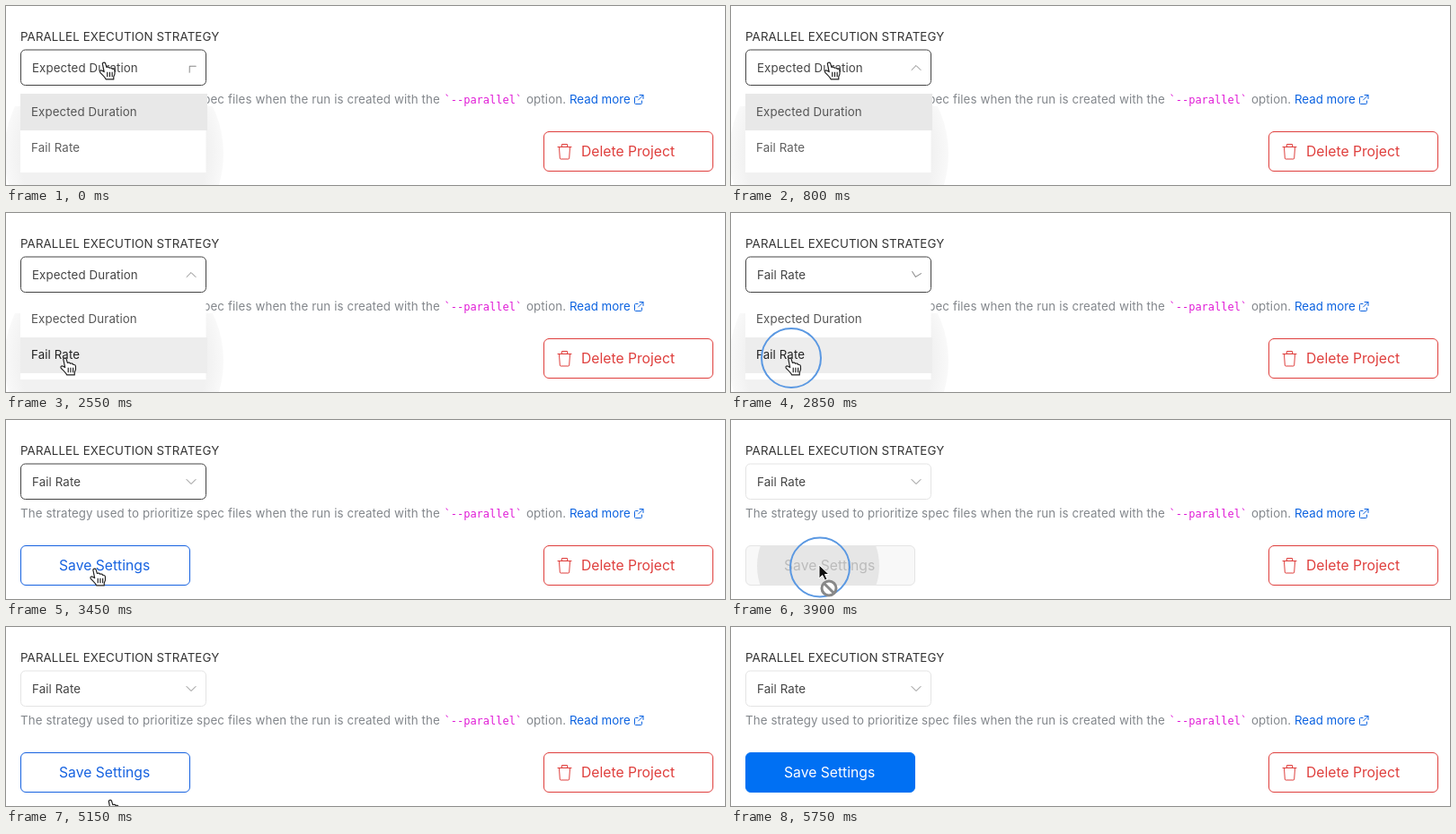
Write an HTML page that moves like this. It is 800 px wide and 200 px high and loops after 5800 ms.

```html
<!DOCTYPE html>
<html>
<head>
<meta charset="utf-8">
<style>
html, body { margin: 0; width: 100%; height: 100%; overflow: hidden; background: #fff; }
svg { display: block; font: 13.3px Inter, sans-serif; letter-spacing: .11px; }
.line { fill: none; stroke-linecap: round; stroke-linejoin: round; }
.big { font-size: 15.7px; letter-spacing: 0; }
.blue { fill: #0b62e0; letter-spacing: 0; }
.code { font: 12px 'DejaVu Sans Mono', monospace; letter-spacing: 0; fill: #e01bd6; }
</style>
</head>
<body>
<svg width="800" height="200" viewBox="0 0 800 200">
  <defs>
    <radialGradient id="soft">
      <stop offset=".85" stop-color="#f1f1f1"/>
      <stop offset="1" stop-color="#f9f9f9"/>
    </radialGradient>
    <clipPath id="saveClip"><rect x="16" y="140" width="189" height="45" rx="6"/></clipPath>
    <clipPath id="menuClip"><rect y="112" width="260" height="88"/></clipPath>
  </defs>

  <text x="16" y="39" fill="#333">PARALLEL EXECUTION STRATEGY</text>
  <rect id="select" x="16.5" y="49" width="206" height="39.5" rx="5" fill="#fff"/>
  <text id="value" x="29" y="73.5" fill="#444"></text>
  <path id="chevron" class="line" d="M-5-2.5 0 2.5 5-2.5" stroke="#888"/>

  <text x="16" y="108.5" fill="#83878c">The strategy used to prioritize spec files when the run is created with the</text>
  <text x="487.5" y="108.5" class="code">`--parallel`</text>
  <text x="579" y="108.5" fill="#83878c">option.</text>
  <text x="627" y="108.5" class="blue">Read more</text>
  <path class="line" stroke="#0b62e0" d="M703 101.5h-2.5q-1 0-1 1v6q0 1 1 1h6q1 0 1-1V106M705 99.5h4v4M709 99.5l-5.5 5.5"/>

  <rect id="save" x="16.5" y="140.5" width="188" height="44" rx="5.5"/>
  <circle id="pulse" cx="97" cy="163" r="68" fill="#e6e6e6" clip-path="url(#saveClip)"/>
  <text id="saveText" class="big" x="59" y="168">Save Settings</text>

  <g stroke="#df3f3d" class="line">
    <rect x="598.5" y="140.5" width="188" height="44" rx="5.5"/>
    <path d="M614 157.5h15M618.5 157v-2.5h6v2.5M615.5 158l.8 12q.1 1 1 1h8.4q.9 0 1-1l.8-12"/>
  </g>
  <text class="big" x="640" y="168" fill="#df3f3d">Delete Project</text>

  <g id="menu">
    <circle cx="120" cy="165" r="122" fill="url(#soft)" clip-path="url(#menuClip)"/>
    <rect x="16" y="98" width="206.5" height="88" fill="#fff"/>
    <rect id="row" x="16" width="208"/>
    <text x="28" y="122.5" fill="#555">Expected Duration</text>
    <text id="fail" x="28" y="163">Fail Rate</text>
  </g>

  <circle id="ring" fill="none" stroke="#5a98e2" stroke-width="2"/>
  <g id="hand" stroke="#222" stroke-width="1.1" stroke-linejoin="round">
    <path fill="#fff" d="M-2 1.2C-1.5-.3.6-.3 1 1L2.2 5C3.2 4.3 4.8 4.8 5.2 5.8 6.2 5.2 7.6 5.7 8 6.8 9.2 6.5 10.4 7.2 10.6 8.6 11 11 10.6 13.5 9.5 15V17.5H1.5C1 15.5-2.5 12.5-4.5 10.2-5.2 8.6-3.6 7.8-2.4 8.6L-.3 9.8Z"/>
    <path d="M3 10v5M5.5 10v5M8 10v5"/>
  </g>
  <g id="blocked" transform="translate(98 162)">
    <path d="M0 0V15L3.7 11.5 6.5 17 9 16 6.5 10.5H11Z" fill="#111" stroke="#fff"/>
    <circle cx="11" cy="26" r="8" fill="#fff" stroke="#888" stroke-width="3"/>
    <path d="M6 21 16 31" stroke="#888" stroke-width="3"/>
  </g>
</svg>
<script>
const LOOP = 5800;
const el = Object.fromEntries([...document.querySelectorAll('[id]')].map(e => [e.id, e]));
const set = (name, attrs) => { for (const k in attrs) el[name].setAttribute(k, attrs[k]); };
const ramp = (t, a, b) => Math.min(1, Math.max(0, (t - a) / (b - a)));
const ease = (t, a, b) => { const u = ramp(t, a, b); return u * u * (3 - 2 * u); };
const within = (t, a, b) => t >= a && t < b;
const blend = (a, b, u) => `rgb(${a.map((v, i) => Math.round(v + (b[i] - v) * u))})`;

const WHITE = [255, 255, 255], BLUE = [0, 112, 243], EDGE = [22, 98, 224];

// Cursor stops: time, x, y
const stops = [[2150, 109.5, 63], [2500, 66, 162], [3050, 66, 162], [3400, 99, 166],
  [4850, 99, 166], [4950, 103, 167], [5300, 125, 210]];

function cursorAt(t) {
  let [, x, y] = stops[0];
  for (let i = 1; i < stops.length; i++) {
    const [a, x0, y0] = stops[i - 1], [b, x1, y1] = stops[i];
    if (t < a) break;
    const u = ease(t, a, b);
    x = x0 + (x1 - x0) * u;
    y = y0 + (y1 - y0) * u;
  }
  return [x, y];
}

function drawSave(t, disabled) {
  const filled = 1 - ease(t, 2950, 3150) + ease(t, 5150, 5350);
  set('save', {
    fill: disabled ? '#f8f8f8' : blend(WHITE, BLUE, filled),
    stroke: disabled ? '#e4e4e4' : blend(EDGE, BLUE, filled)
  });
  set('saveText', { fill: disabled ? '#bbb' : blend(EDGE, WHITE, filled) });
  set('pulse', { opacity: disabled ? 1 - ramp(t, 3950, 4150) : 0 });
}

function draw(t) {
  const [x, y] = cursorAt(t);
  const onFail = y > 139;
  const disabled = within(t, 3800, 4550);

  el.value.textContent = t < 2700 ? 'Expected Duration' : 'Fail Rate';
  set('select', { stroke: t < 3800 ? '#444' : '#e4e4e4' });
  const turn = 135 + 45 * ramp(t, 0, 80) - 180 * ease(t, 2700, 2880);
  set('chevron', { transform: `translate(206 69) rotate(${turn})` });

  set('menu', { opacity: 1 - ramp(t, 2880, 3000) });
  set('row', { y: onFail ? 139 : 98, height: onFail ? 40 : 41, fill: onFail ? '#ededed' : '#e8e8e8' });
  set('fail', { fill: blend([95, 95, 95], [35, 35, 35], ramp(t, 1250, 1450)) });
  drawSave(t, disabled);

  const first = t < 3200;
  const start = first ? 2680 : 3730;
  set('ring', {
    cx: first ? 67 : 99, cy: first ? 162 : 164.5,
    r: 22 + 11 * ease(t, start, start + 150),
    opacity: t < start ? 0 : 1 - ramp(t, start + 200, start + 320)
  });

  const shown = t < 2150 ? 1 - ramp(t, 950, 1100) : 1;
  set('hand', { transform: `translate(${x} ${y}) scale(1.08)`, opacity: disabled ? 0 : shown });
  set('blocked', { opacity: disabled ? 1 : 0 });
}

const begin = performance.now();
function tick(now) {
  draw(Math.max(0, now - begin) % LOOP);
  requestAnimationFrame(tick);
}
draw(0);
requestAnimationFrame(tick);
</script>
</body>
</html>
```
